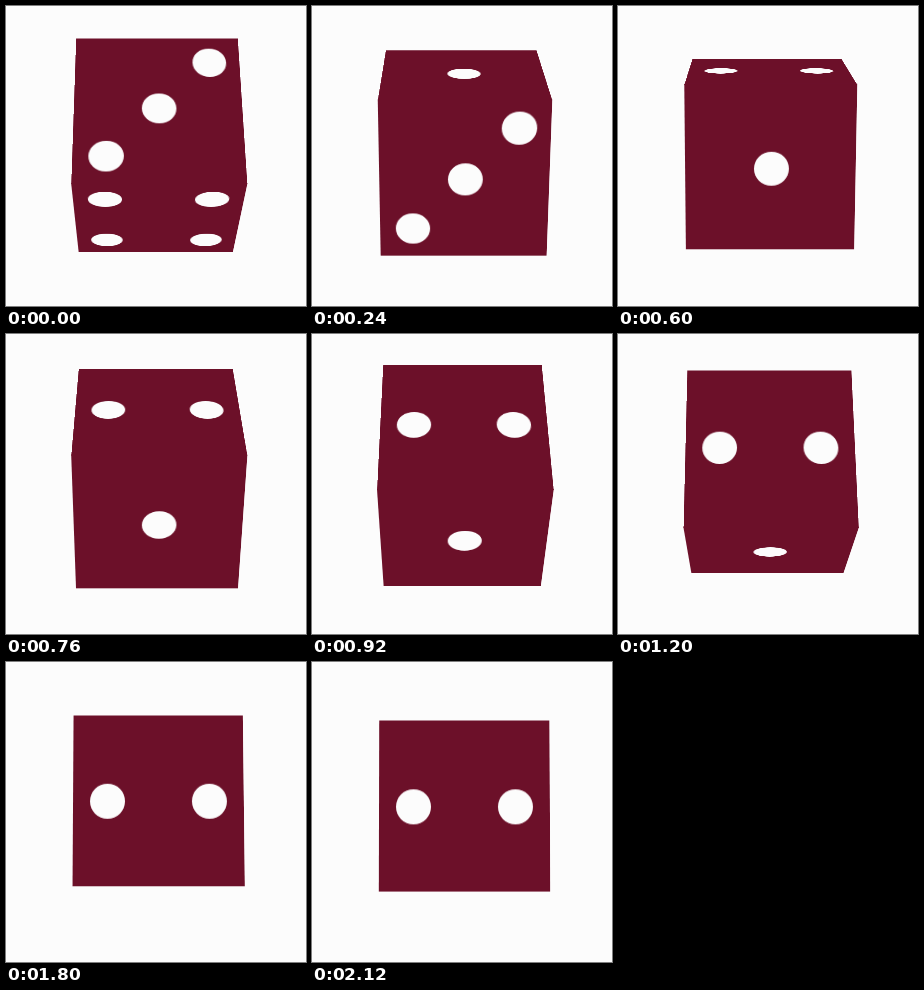
Write an HTML page without scripts that moves like this. It is 300x300 px and loops after 2160 ms.

```html
<!DOCTYPE html>
<html lang="en">
<head>
<meta charset="utf-8">
<title>Rolling die</title>
<style>
  @property --n {
    syntax: "<number>";
    inherits: false;
    initial-value: 0;
  }
  html, body {
    margin: 0;
    width: 100%;
    height: 100%;
    overflow: hidden;
    background: #fcfcfc;
  }
  .stage {
    position: relative;
    width: 300px;
    height: 300px;
    overflow: hidden;
    perspective: 1045px;
    perspective-origin: 125px 72.8px;
  }
  /* --n counts 40 ms ticks; the spin slows exponentially */
  .die {
    position: absolute;
    left: 67.4px;
    top: 62.3px;
    width: 171px;
    height: 171px;
    transform-style: preserve-3d;
    --angle: calc(1deg * min(212 - 1.5 * max(0, var(--n) - 1), 163.8 * exp(-0.0767 * (var(--n) - 6)) - 2));
    transform: translateZ(-85px) rotateX(var(--angle));
    animation: roll 2160ms steps(54) infinite;
  }
  @keyframes roll {
    from { --n: 0; }
    to { --n: 54; }
  }
  .face {
    position: absolute;
    inset: 0;
    background: #6c1029;
    backface-visibility: hidden;
    transform: rotateX(var(--turn)) translateZ(84.6px);
  }
  /* --cx, --cy: centre of the pips; --dx, --dy: their spread */
  .two { --turn: 0deg; --cx: 85.5px; --cy: 86.8px; --dx: 51px; --dy: 0px; }
  .one { --turn: -90deg; --cx: 86.4px; --cy: 86.7px; --dx: 0px; --dy: 0px; }
  .three { --turn: -180deg; --cx: 86.5px; --cy: 85.3px; --dx: 53px; --dy: 54.7px; }
  .four { --turn: -270deg; --cx: 85.5px; --cy: 87.2px; --dx: 53.5px; --dy: 50.8px; }
  .face i {
    position: absolute;
    left: calc(var(--cx) - 17.4px + var(--dx) * var(--x, 0));
    top: calc(var(--cy) - 17.4px + var(--dy) * var(--y, 0));
    width: 34.8px;
    height: 34.8px;
    border-radius: 50%;
    background: #fcfcfc;
  }
  .l { --x: -1; }
  .r { --x: 1; }
  .t { --y: -1; }
  .b { --y: 1; }
</style>
</head>
<body>
<div class="stage">
  <div class="die">
    <div class="face four"><i class="l t"></i><i class="r t"></i><i class="l b"></i><i class="r b"></i></div>
    <div class="face three"><i class="r t"></i><i></i><i class="l b"></i></div>
    <div class="face one"><i></i></div>
    <div class="face two"><i class="l"></i><i class="r"></i></div>
  </div>
</div>
</body>
</html>
```
